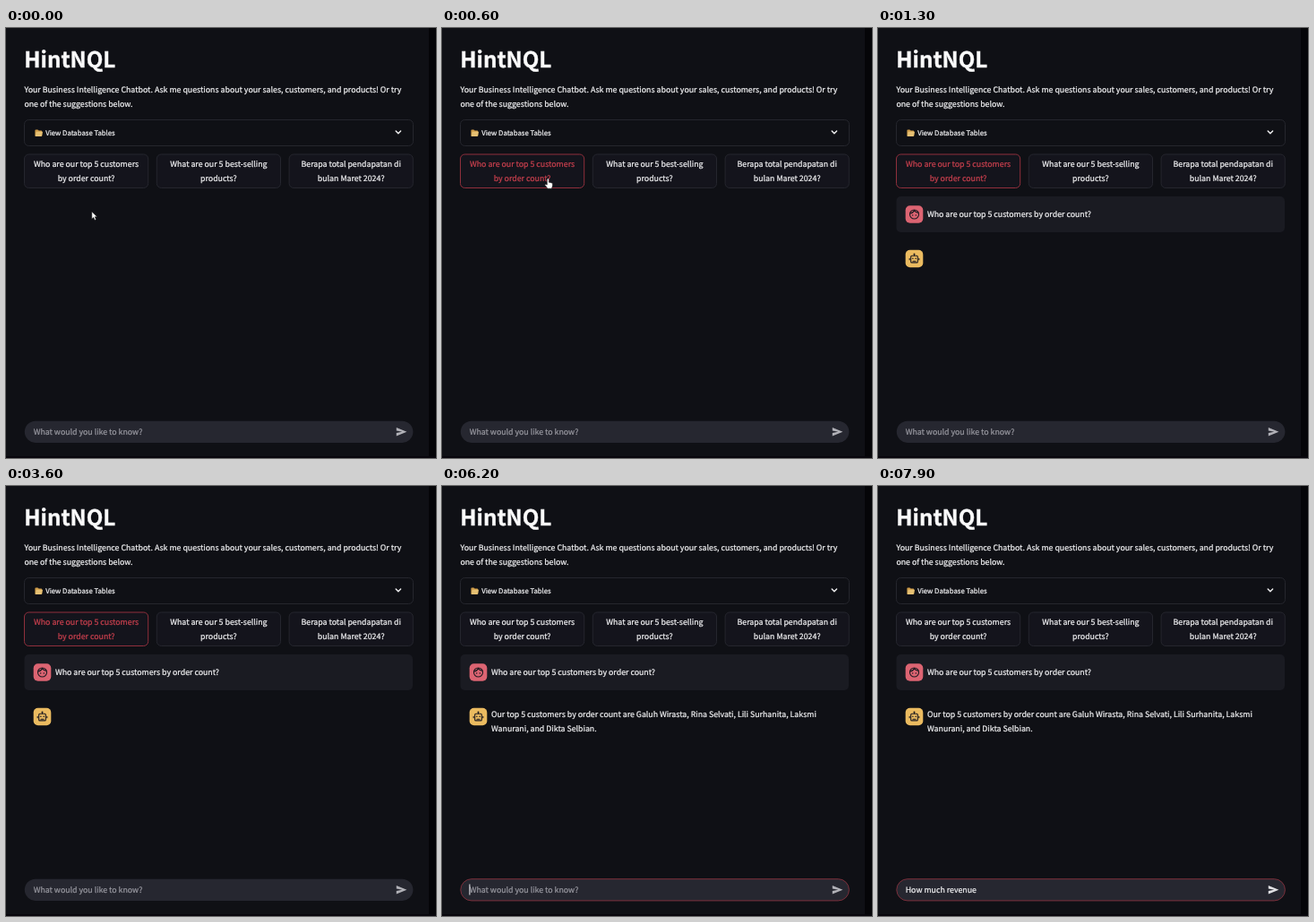
These frames come from a looping animation (480x480 px, 8 s). An HTML page:

```html
<!DOCTYPE html>
<html lang="en">
<head>
<meta charset="utf-8">
<title>Chat demo</title>
<style>
  html, body { margin: 0; width: 100%; height: 100%; overflow: hidden; background: #0f1015; }
  svg { display: block; width: 100%; height: 100%; }
  text {
    font: 8.8px "Noto Sans CJK JP", "Noto Sans CJK SC", "Noto Sans CJK", "Noto Sans", sans-serif;
    fill: #f1f1f3; white-space: pre; text-rendering: geometricPrecision;
    stroke: #f1f1f3; stroke-width: .24px;
  }
  .title { font-size: 24.17px; font-weight: 700; fill: #fafafa; stroke-width: .45px; }
  .label { font-size: 7.75px; }
  .mid { text-anchor: middle; }
  .hint { fill: #96969e; stroke: #96969e; }
  .btn rect { fill: #14141c; stroke: #25262e; }
  .btn.hot rect { stroke: #8f2f3c; }
  .btn.hot text { fill: #c63f4d; stroke: #c63f4d; }
  .icon { fill: none; stroke: #1d1a20; stroke-width: 1.1; stroke-linecap: round; stroke-linejoin: round; }
  .dot { fill: #1d1a20; }
</style>
</head>
<body>
<svg viewBox="0 0 480 480">
  <rect width="480" height="480" fill="#0f1015"/>
  <rect x="472" width="8" height="480" fill="#050508"/>
  <rect y="478" width="480" height="2" fill="#08060c"/>

  <text class="title" x="20.3" y="43.8">HintNQL</text>
  <text x="20.4" y="71.9">Your Business Intelligence Chatbot. Ask me questions about your sales, customers, and products! Or try</text>
  <text x="20.4" y="87.6">one of the suggestions below.</text>

  <rect x="20.5" y="102.5" width="434" height="29" rx="5" fill="none" stroke="#25262d"/>
  <path d="M32.4 114.4q0-1 1-1h2.1l1.1 1.1h2.7q.9 0 .9.9v5.1h-7.8z" fill="#cf9c49"/>
  <path d="M32.7 120.9l.9-4.6q.2-.6.9-.6h6.5l-.9 4.6q-.2.8-.9.8h-5.8q-.7 0-.7-.2z" fill="#e6c073"/>
  <text class="label" x="44.2" y="119.8">View Database Tables</text>
  <path d="M435.2 115l2.7 2.7 2.7-2.7" fill="none" stroke="#f1f1f3" stroke-width="1.4" stroke-linecap="round" stroke-linejoin="round"/>

  <g id="buttons"></g>

  <g id="ask">
    <rect x="20.5" y="188" width="433.5" height="40" rx="5" fill="#1a1b22"/>
    <rect x="30.7" y="198.2" width="19.6" height="19.6" rx="5" fill="#dc6472"/>
    <g class="icon">
      <circle cx="40.5" cy="208" r="5"/>
      <path d="M35.9 207q3.3-.4 4.6-3.5 1.6 2.7 4.6 2.7"/>
    </g>
    <circle class="dot" cx="38.7" cy="209" r=".75"/>
    <circle class="dot" cx="42.3" cy="209" r=".75"/>
    <text x="55" y="211.2">Who are our top 5 customers by order count?</text>
  </g>

  <g id="bot">
    <rect x="30.7" y="247.7" width="19.6" height="19.6" rx="5" fill="#ebbb60"/>
    <g class="icon">
      <rect x="36.7" y="254.3" width="7.6" height="7.6" rx="1"/>
      <path d="M40.5 254v-1.4M35.2 257.2v1.6M45.8 257.2v1.6M39 260.2h3"/>
    </g>
    <circle class="dot" cx="40.5" cy="252.6" r="1"/>
    <circle class="dot" cx="38.9" cy="257.3" r=".8"/>
    <circle class="dot" cx="42.1" cy="257.3" r=".8"/>
  </g>

  <g id="answer">
    <text x="55" y="258.4">Our top 5 customers by order count are Galuh Wirasta, Rina Selvati, Lili Surhanita, Laksmi</text>
    <text x="55" y="274.1">Wanurani, and Dikta Selbian.</text>
  </g>

  <rect id="field" x="20.8" y="438.7" width="433.6" height="24.2" rx="12.1" fill="#262730"/>
  <text id="hint" class="hint" x="30.7" y="453.8">What would you like to know?</text>
  <text id="typed" x="30.7" y="453.8"></text>
  <rect id="caret" y="444.5" width="1" height="12" fill="#f1f1f3"/>
  <path id="send" d="M435.8 446l11.6 4.8-11.6 4.8v-3.6l6.4-1.2-6.4-1.2z"/>

  <path id="arrow" d="M0 0v8.2l1.9-1.8 1.4 3 1.5-.7-1.4-2.9h2.5z" fill="#fff" stroke="#111" stroke-width=".5"/>
  <path id="hand" d="M-1 .8q1-1.4 2 0v3.4q3.2.3 4.1 1.4.5 3-1 5.6h-4.6q-1.3-2.3-3-4 .4-1.4 2.5-.1z" fill="#fff" stroke="#111" stroke-width=".5"/>
</svg>
<script>
const LOOP = 8000;
const PROMPT = "How much revenue";
const FOCUS = 5400;
const TYPE = 6400;

const $ = id => document.getElementById(id);
const show = (id, on) => $(id).setAttribute("visibility", on ? "visible" : "hidden");
const during = (t, from, to) => t >= from && t < to;
const ease = k => k * k * (3 - 2 * k);

const suggestions = [
  ["Who are our top 5 customers", "by order count?"],
  ["What are our 5 best-selling", "products?"],
  ["Berapa total pendapatan di", "bulan Maret 2024?"]
];
$("buttons").innerHTML = suggestions.map(([top, low], i) => {
  const x = 20.5 + i * 147.8, mid = x + 69.1;
  return `<g class="btn"><rect x="${x}" y="141" width="138.2" height="37.5" rx="5"/>
    <text class="mid" x="${mid}" y="155.2">${top}</text>
    <text class="mid" x="${mid}" y="170.9">${low}</text></g>`;
}).join("");
const firstButton = document.querySelector(".btn");

function place(id, t, start, end, from, to) {
  const k = ease(Math.min(1, Math.max(0, (t - start) / (end - start))));
  const [x, y] = from.map((v, i) => v + (to[i] - v) * k);
  $(id).setAttribute("transform", `translate(${x} ${y})`);
}

function typedCount(t) {
  if (t < TYPE) return 0;
  if (t < 6500) return 1;
  if (t < 6700) return 3;
  return Math.min(PROMPT.length, 4 + Math.floor((t - 6700) / 83));
}

function draw(t) {
  firstButton.classList.toggle("hot", during(t, 200, FOCUS));
  show("ask", t >= 900);
  show("bot", t >= 1200);
  show("answer", t >= 4000);

  show("arrow", t < 200 || during(t, 5000, 5300));
  show("hand", during(t, 200, 900));
  if (t < 1000) {
    place("arrow", t, 50, 300, [95.8, 205], [118.3, 168]);
    place("hand", t, 50, 300, [95.8, 205], [118.3, 168]);
  } else {
    place("arrow", t, 5000, 5300, [45.5, 386.5], [62, 446]);
  }

  const typing = t >= TYPE;
  const typed = $("typed");
  typed.textContent = PROMPT.slice(0, typedCount(t));
  show("hint", !typing);
  $("field").setAttribute("stroke", t >= FOCUS ? "#7c2f3b" : "none");
  $("send").setAttribute("fill", typing ? "#e2e2e5" : "#b2b2b8");
  show("caret", during(t, FOCUS, 5800) || during(t, 6200, 7900));
  $("caret").setAttribute("x", 30.4 + (typing ? typed.getComputedTextLength() : 0));
}

const began = performance.now();
function tick() {
  draw((performance.now() - began) % LOOP);
  requestAnimationFrame(tick);
}
tick();
</script>
</body>
</html>
```
